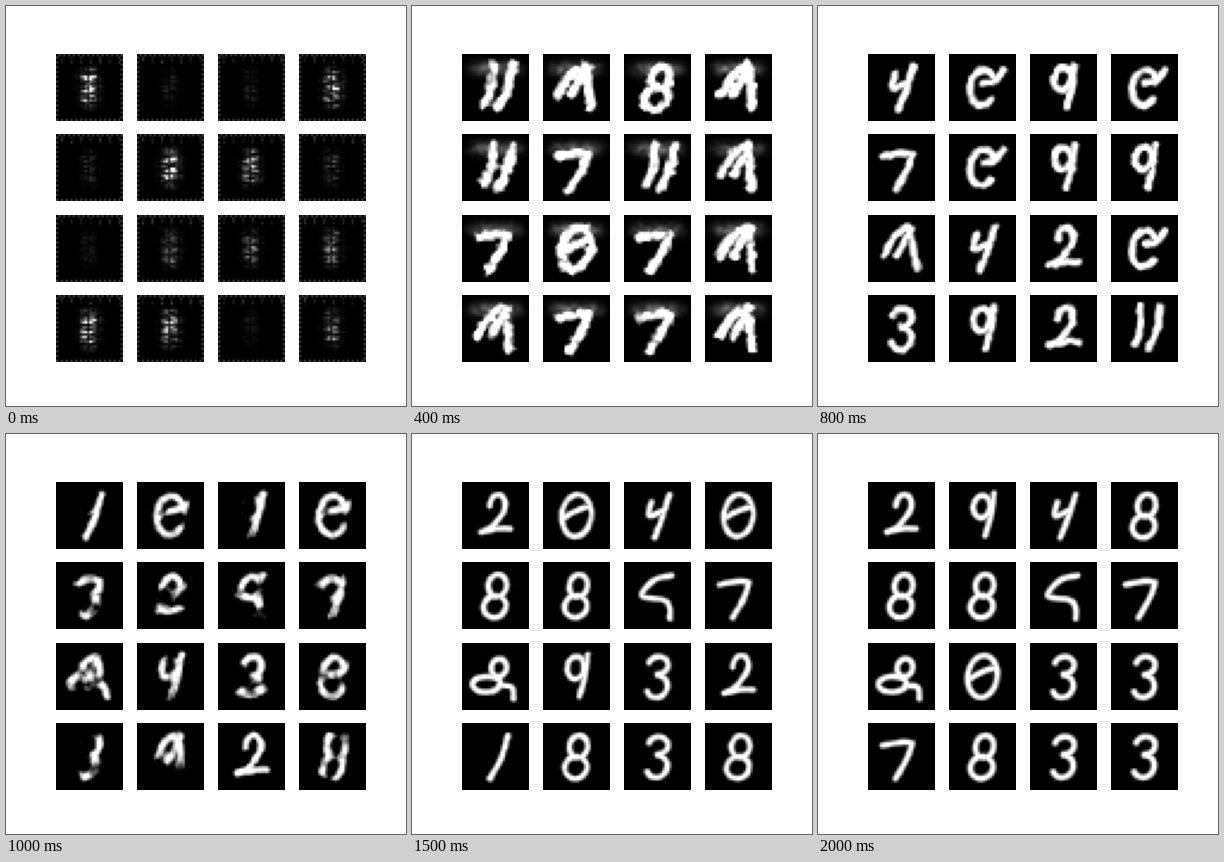
Write a matplotlib script that moves like this. It is 400 px wide and 400 px high and loops after 2.1 s.

```python
import numpy as np
import matplotlib.pyplot as plt
from matplotlib.animation import FuncAnimation

N = 28        # cells per tile side
STEPS = 21

row, col = np.mgrid[:N, :N]
X, Y = (col - 13.5) / 5.85, (row - 13.5) / 9.2    # glyph units, y downwards


def arc(cx, cy, rx, ry, start=0, stop=1):
    """Part of an ellipse, angles in turns clockwise from the right."""
    a = 2 * np.pi * np.linspace(start, stop, 60)
    return np.column_stack([cx + rx * np.cos(a), cy + ry * np.sin(a)])


def curve(*flat):
    """Catmull-Rom curve through x, y pairs."""
    p = np.reshape(flat, (-1, 2))
    p = np.vstack([p[:1], p, p[-1:]])
    t = np.linspace(0, 1, 24)[:, None]
    return np.vstack([
        b + t / 2 * (c - a + t * (2*a - 5*b + 4*c - d + t * (3*(b - c) + d - a)))
        for a, b, c, d in zip(p, p[1:], p[2:], p[3:])])


GLYPHS = {
    "0": [arc(0, 0, 1.05, .95), curve(-.9, .1, .1, -.25, .9, -.4)],
    "1": [curve(.8, -.95, .4, .1, -.3, 1)],
    "2": [arc(.1, -.45, .55, .5, -.5, .12),
          curve(.5, -.1, -.2, .5, -.95, .75), curve(-.95, .75, .2, .6, 1.1, .6)],
    "3": [arc(0, -.5, .7, .4, -.45, .25), arc(0, .45, .75, .5, -.25, .42)],
    "4": [curve(.75, -.95, .3, .2, -.1, 1), curve(-.5, -.6, -.6, 0, .3, -.2)],
    "5": [curve(.9, -.9, -.3, -.7, -1.1, 0, .4, .2, .9, .5, 1, 1.05)],
    "6": [arc(0, 0, .9, .8, -.1, -.88), curve(0, -.2, .8, -.3, 1.4, -.8)],
    "7": [curve(-1.4, -.5, 0, -.65, .7, -.6), curve(.7, -.6, .4, .1, -.3, 1)],
    "8": [arc(.1, -.45, .65, .5), arc(0, .5, .8, .5)],
    "9": [arc(-.1, -.4, .6, .5), curve(.7, -1, .6, 0, .3, .9)],
    "&": [arc(.2, -.4, .55, .4), arc(-.6, .35, 1, .35),
          curve(.3, .4, 1.2, .5, 1.4, 1)],
    "M": [curve(-1.2, .3, -.6, -.5, .3, -1), curve(-.3, .3, .6, -.9),
          curve(.4, -1, .8, -.1, 1.2, .9)],
    "u": [curve(-.4, -1, -.3, 0, -.6, .7), curve(1, -1, .9, 0, .4, .9)],
    "=": [curve(-1.1, .3, .9, -.9), curve(-.4, 1, 1.6, -.15)],
    "#": [curve(-1.1, -.4, -.2, -1), curve(-.7, .7, 1.5, -.65),
          curve(-.2, 1.2, 1.4, .4)],
    "z": [curve(-.7, 0, .9, -.9), curve(.7, -.6, .1, .1, 1, .1, -.2, 1)],
    "o": [curve(.2, -.8, .5, 0, .1, 1), curve(-.4, .6, 1, -.4)],
}

# Step at which a stage is reached: what the tiles show, stroke radius, slant
STAGES = {
    2: ("z###" "=oo=" "====" "z==o", 2.6, 0),
    4: ("uM8M" "u7uM" "707M" "M77M", 1.95, .25),
    8: ("4696" "7699" "M426" "392u", 1.5, .1),
    12: ("1010" "3257" "&938" "1M28", 1.2, .05),
    15: ("2040" "8857" "&932" "1838", 1.2, .1),
    20: ("2948" "8857" "&033" "7833", 1.25, .12),
}


def field(name, radius, slant):
    """How deep each cell lies inside the strokes, in cells."""
    x, y = np.vstack(GLYPHS[name]).T
    dx = 5.85 * (X[..., None] - x + slant * y)
    dy = 9.2 * (Y[..., None] - y)
    return np.clip(radius - np.hypot(dx, dy).min(axis=2), -2.5, 1.3)


keys = list(STAGES)
fields = [np.array([field(g, r, s) for g in names])
          for names, r, s in STAGES.values()]
weave = .3 + .7 * ((row % 4 != 0) & (col % 4 != 1))


def blur(a, axes=(-1, -2)):
    for ax in axes:
        a = (np.roll(a, 1, ax) + 2 * a + np.roll(a, -1, ax)) / 4
    return a


def untrained(rng):
    """Black tiles with a speckled column, strong in some, faint in others."""
    level = np.array([1, .14, .14, 1, .2, .95, .85, .25,
                      .14, .45, .4, .55, 1, .8, .1, .45])
    speck = blur(rng.random((16, N, N)) ** 2, axes=[-1]) * weave
    column = np.exp(-(X / .55) ** 2 - (Y / .8) ** 4)
    img = 2 * level[:, None, None] * column * speck
    border = np.minimum.reduce([row, col, N - 1 - row, N - 1 - col]) == 0
    img += .22 * border * ((row + col) % 2)
    return img + .3 * speck * ((row < 4) & (col % 4 == 2))


def samples(step):
    rng = np.random.default_rng(70 + step)
    if step == 0:
        return untrained(rng)
    hi = max(1, np.searchsorted(keys, step))
    t = np.clip((step - keys[hi - 1]) / (keys[hi] - keys[hi - 1]), 0, 1)
    score = (1 - t) * fields[hi - 1] + t * fields[hi]

    # Ragged edges and horizontal ribs that settle down with training
    early = np.clip((4 - step) / 2, 0, 1)
    rough = 1.6 * .88 ** step
    score = score + rough * blur(rng.standard_normal((16, N, N)))
    score += .5 * early * np.cos(np.pi * row / 2)
    img = np.clip(.5 + score / (3 if step == 1 else 1.3), 0, 1)

    # Haze: woven on the right at first, then a soft patch near the top
    woven = .9 * early * weave / (1 + np.exp(-3 * (X + .5)))
    patch = .7 * np.exp(-((Y + .85) / .3) ** 2 - (X / 1.8) ** 4)
    patch = patch * np.clip((8 - step) / 4, 0, 1) * (1 - early)
    img = np.maximum(img, (woven + patch) * blur(rng.random((16, N, N))))
    return img * (.75 * weave if step == 1 else 1)


fig, axes = plt.subplots(4, 4, figsize=(4, 4), dpi=100)
tiles = []
for ax in axes.flat:
    tiles.append(ax.imshow(np.zeros((N, N)), cmap="gray", vmin=0, vmax=1))
    ax.axis("off")


def draw(step):
    for tile, img in zip(tiles, samples(step)):
        tile.set_data(np.clip(img, 0, 1))
    return tiles


anim = FuncAnimation(fig, draw, frames=STEPS, interval=100, repeat=True,
                     repeat_delay=0)
plt.show()
```
